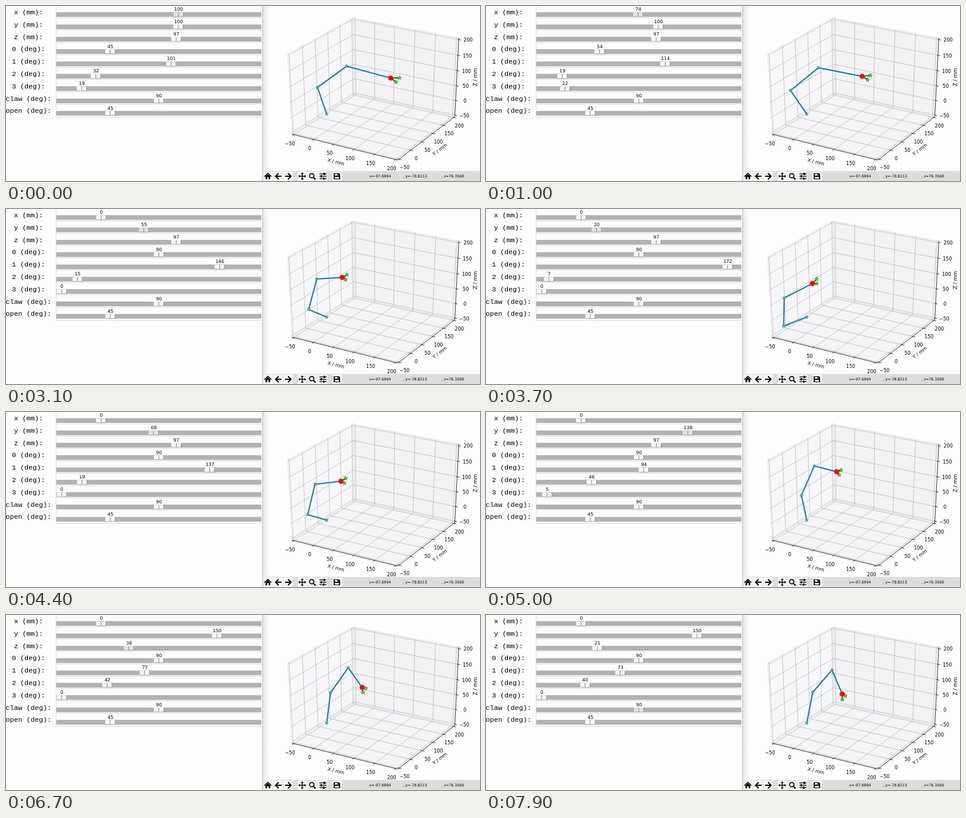
An HTML page with a canvas that plays this animation: 800 by 295 pixels, repeating every 8 s.

```html
<!DOCTYPE html>
<html lang="en">
<head>
<meta charset="utf-8">
<title>Robot arm sliders</title>
<style>
  html, body { margin: 0; width: 100%; height: 100%; overflow: hidden; background: #fefdfe; }
  canvas { display: block; }
</style>
</head>
<body>
<canvas id="stage" width="800" height="295"></canvas>
<script>
const ctx = document.getElementById('stage').getContext('2d');
const SANS = '"DejaVu Sans", sans-serif';
const PAPER = '#fefdfe';
const LOOP = 8000, STEP = 100, LAG = 100;
const DEG = Math.PI / 180;

// ---- motion: [time, value] pairs, linear in between ----
const tracks = {
  x: [[500, 100.3], [1000, 73.8], [1900, -10], [2100, -10], [2300, 0]],
  y: [[2700, 100], [3100, 55.4], [3700, 20], [4400, 68], [5100, 150]],
  z: [[5600, 97.3], [6100, 81], [6900, 21]],
  bend: [[500, 18.52], [1000, 21.52], [1400, 7], [1600, 0],
         [4500, 0], [5100, 6], [5600, 6], [6100, 4.2], [6400, 0]]
};

function valueAt(keys, t) {
  if (t <= keys[0][0]) return keys[0][1];
  for (let i = 1; i < keys.length; i++) {
    const [t0, v0] = keys[i - 1], [t1, v1] = keys[i];
    if (t <= t1) return v0 + (v1 - v0) * (t - t0) / (t1 - t0);
  }
  return keys[keys.length - 1][1];
}

// ---- inverse kinematics: upper arm, forearm, hand (mm) ----
const UPPER = 92, FORE = 86.9, HAND = 109.5, CLAW = 19;

function poseAt(t) {
  const x = valueAt(tracks.x, t), y = valueAt(tracks.y, t);
  const z = valueAt(tracks.z, t), bend = valueAt(tracks.bend, t);
  const yaw = Math.atan2(y, x), reach = Math.hypot(x, y);
  const fold = (90 - bend) * DEG;
  const tailX = FORE + HAND * Math.cos(fold), tailY = HAND * Math.sin(fold);
  const tail = Math.hypot(tailX, tailY), dist = Math.hypot(reach, z);
  const shoulder = Math.atan2(z, reach) +
    Math.acos((UPPER ** 2 + dist ** 2 - tail ** 2) / (2 * UPPER * dist));
  const elbow = Math.atan2(z - UPPER * Math.sin(shoulder), reach - UPPER * Math.cos(shoulder)) +
    Math.atan2(tailY, tailX);
  return {
    yaw, shoulder, elbow, wrist: elbow - fold,
    sliders: [x, y, z, yaw / DEG, shoulder / DEG, (elbow - shoulder) / DEG + 90, bend, 90, 45]
  };
}

// ---- drawing helpers ----
function line(points, color, width, close, fill) {
  ctx.beginPath();
  points.forEach(p => ctx.lineTo(p[0], p[1]));
  if (close) ctx.closePath();
  if (fill) { ctx.fillStyle = fill; ctx.fill(); }
  if (color) { ctx.strokeStyle = color; ctx.lineWidth = width; ctx.stroke(); }
}

function rect(x, y, w, h, color) {
  ctx.fillStyle = color;
  ctx.fillRect(x, y, w, h);
}

function label(text, x, y, font, angle = 0, align = 'center') {
  ctx.save();
  ctx.translate(x, y);
  ctx.rotate(angle * DEG);
  ctx.font = font;
  ctx.textAlign = align;
  ctx.textBaseline = 'alphabetic';
  ctx.fillStyle = '#000';
  ctx.fillText(text, 0, 3);
  ctx.restore();
}

function disc(x, y, r, color) {
  ctx.beginPath();
  ctx.arc(x, y, r, 0, 2 * Math.PI);
  ctx.fillStyle = color;
  ctx.fill();
}

function star([x, y], size, fill, stroke) {
  const points = [];
  for (let i = 0; i < 10; i++) {
    const r = i % 2 ? size * 0.42 : size, a = (i * 36 - 90) * DEG;
    points.push([x + r * Math.cos(a), y + r * Math.sin(a)]);
  }
  line(points, stroke, 0.8, true, fill);
}

// ---- sliders ----
const names = ['x (mm):', 'y (mm):', 'z (mm):', '0 (deg):', '1 (deg):',
               '2 (deg):', '3 (deg):', 'claw (deg):', 'open (deg):'];

function activeSlider(t) {
  if (t < 2300) return 0;
  if (t >= 2600 && t < 5200) return 1;
  if (t >= 5500 && t < 7300) return 2;
  return t >= 7900 ? 7 : -1;
}

function drawSliders(values, active) {
  values.forEach((value, i) => {
    const top = i * 20.8, y = top + 10.4;
    const center = i < 3 ? 160.5 + 1.303 * value : 94 + 1.822 * value;
    const left = center - 8.5;
    label(names[i], 38, top + 11, '11.67px "Liberation Mono", monospace');
    rect(84, top - 1, 348, 0.8, '#d4d4d4');
    rect(84, top, 0.8, 20, '#d4d4d4');
    rect(85, y, 346, 8, '#b1b1b1');
    rect(left, y, 17, 8, '#8c8c8c');
    rect(left, y, 16.2, 7.3, i === active ? '#e2e2e2' : '#f7f7f7');
    rect(left + 8, y + 0.5, 0.9, 6.8, '#777');
    label(String(Math.round(value)), center + 0.3, top + 5.2, '7.8px ' + SANS);
  });
  rect(84, 187, 348, 0.8, '#d4d4d4');
}

// ---- 3D axes: azimuth -60, elevation 30, mild perspective ----
const LO = -55.2, HI = 205.2;
const COS60 = 0.5, SIN60 = Math.sqrt(3) / 2;

function project(x, y, z) {
  [x, y, z] = [x, y, z].map(v => (v - LO) / (HI - LO) - 0.5);
  const depth = x * SIN60 * COS60 - y * SIN60 * SIN60 + z * 0.5;
  const scale = 10 / (10 - depth);
  const across = x * SIN60 + y * COS60;
  const up = -x * 0.25 + y * SIN60 * 0.5 + z * SIN60;
  return [622.1 + 206.3 * across * scale, 135.7 - 154.7 * up * scale];
}

const path3 = points => points.map(p => project(...p));

function drawAxes() {
  const ticks = [-50, 0, 50, 100, 150, 200];
  const pane = (points, fill) => line(path3(points), '#dedee0', 0.7, true, fill);
  pane([[LO, LO, LO], [LO, HI, LO], [LO, HI, HI], [LO, LO, HI]], '#f6f6f8');
  pane([[LO, HI, LO], [HI, HI, LO], [HI, HI, HI], [LO, HI, HI]], '#f2f2f4');
  pane([[LO, LO, LO], [HI, LO, LO], [HI, HI, LO], [LO, HI, LO]], '#f4f4f6');

  for (const t of ticks) {
    line(path3([[t, LO, LO], [t, HI, LO], [t, HI, HI]]), '#bababa', 0.8);
    line(path3([[HI, t, LO], [LO, t, LO], [LO, t, HI]]), '#bababa', 0.8);
    line(path3([[LO, LO, t], [LO, HI, t], [HI, HI, t]]), '#bababa', 0.8);
  }
  line(path3([[LO, LO, LO], [HI, LO, LO], [HI, HI, LO], [HI, HI, HI]]), '#111', 0.8);

  const font = '8px ' + SANS;
  const tick = (t, point, inner, outer, dx, dy) => {
    const [x, y] = project(...point);
    line(path3([inner, outer]), '#111', 0.8);
    label(String(t).replace('-', '\u2212'), x + dx, y + dy, font);
  };
  for (const t of ticks) {
    tick(t, [t, LO, LO], [t, LO + 3, LO], [t, LO - 6, LO], -6.5, 14.9);
    tick(t, [HI, t, LO], [HI - 3, t, LO], [HI + 6, t, LO], 9.5, 13.9);
    tick(t, [HI, HI, t], [HI - 2, HI, t], [HI + 5, HI, t], 15.8, 0.9);
  }
  label('X / mm', 557, 262.5, font, 14);
  label('Y / mm', 732, 241.5, font, -37);
  label('Z / mm', 792, 120, '8.5px ' + SANS, -90);
}

function drawArm({ yaw, shoulder, elbow, wrist }) {
  const place = (r, z) => project(r * Math.cos(yaw), r * Math.sin(yaw), z);
  let r = 0, z = 0;
  const joints = [place(r, z)];
  for (const [length, angle] of [[UPPER, shoulder], [FORE, elbow], [HAND, wrist]]) {
    r += length * Math.cos(angle);
    z += length * Math.sin(angle);
    joints.push(place(r, z));
  }
  const hand = joints.pop();
  const tips = [1, -1].map(side => {
    const a = wrist + side * 22.5 * DEG;
    return place(r + CLAW * Math.cos(a), z + CLAW * Math.sin(a));
  });
  ctx.lineJoin = 'round';
  line([...joints, hand], '#1f77b4', 2.1);
  joints.forEach(p => star(p, 3, '#4fa9c4', '#3f9a5c'));
  line([tips[0], hand, tips[1]], '#078007', 2.1);
  tips.forEach(p => star(p, 3.5, '#62d83a', '#118a22'));
  disc(...hand, 4.3, '#f00');
  ctx.lineJoin = 'miter';
}

// ---- window edge and toolbar ----
function drawWindowEdge() {
  const shade = ctx.createLinearGradient(432, 0, 444, 0);
  shade.addColorStop(0, '#cfcfcf');
  shade.addColorStop(0.4, '#f0f0f0');
  shade.addColorStop(1, PAPER);
  rect(432, 0, 12, 295, shade);
}

function drawToolbar() {
  rect(433, 278, 367, 17, '#dcdcdc');
  for (const x of [434.5, 451.3, 468.1, 492.5, 509.3, 526.1, 551]) {
    rect(x, 279, 16, 16, '#f5f5f5');
  }
  line([[436, 287.5], [442, 282], [448, 287.5]], '#000', 1.5);
  line([[438, 287], [442, 283.5], [446, 287], [446, 292], [443.2, 292], [443.2, 288.5],
        [440.8, 288.5], [440.8, 292], [438, 292]], null, 0, true, '#000');
  for (const [x, d] of [[460, -1], [476, 1]]) {
    line([[x - 5 * d, 287], [x + 4 * d, 287]], '#000', 2);
    line([[x, 282], [x + 5 * d, 287], [x, 292]], '#000', 2);
  }
  line([[495, 287], [505, 287]], '#000', 1.5);
  line([[500, 282], [500, 292]], '#000', 1.5);
  for (const [dx, dy] of [[1, 0], [-1, 0], [0, 1], [0, -1]]) {
    const x = 500 + dx * 4, y = 287 + dy * 4;
    line([[x + dx * 2.5, y + dy * 2.5], [x + dy * 2.5, y + dx * 2.5],
          [x - dy * 2.5, y - dx * 2.5]], null, 0, true, '#000');
  }
  ctx.beginPath();
  ctx.arc(516, 286, 3.7, 0, 2 * Math.PI);
  ctx.strokeStyle = '#000';
  ctx.lineWidth = 1.7;
  ctx.stroke();
  line([[518.7, 288.7], [522.5, 292.5]], '#000', 2.2);
  [[283, 537], [287, 532], [291, 536]].forEach(([y, knob]) => {
    line([[529, y], [541, y]], '#000', 1.3);
    rect(knob - 1, y - 2, 2.4, 4, '#000');
  });
  line([[553, 282], [562, 282], [564, 284], [564, 292], [553, 292]], null, 0, true, '#000');
  rect(555, 283, 6, 3, '#f5f5f5');
  rect(555, 288, 7, 3, '#f5f5f5');
  rect(559, 283, 1.3, 2.4, '#000');
  const font = '6.2px ' + SANS;
  label('x=-97.6994', 613, 286.3, font, 0, 'left');
  label(', y=-78.8213', 670, 286.3, font, 0, 'left');
  label(', z=76.3568', 735, 286.3, font, 0, 'left');
}

function frame() {
  const t = Math.floor(performance.now() % LOOP / STEP) * STEP;
  // The plot trails the sliders and only redraws during a drag.
  const plotTime = t < 2800 ? Math.min(t - LAG, 2000) : t - LAG;
  rect(0, 0, 800, 295, PAPER);
  drawSliders(poseAt(t).sliders, activeSlider(t));
  drawWindowEdge();
  drawAxes();
  drawArm(poseAt(plotTime));
  drawToolbar();
  requestAnimationFrame(frame);
}
frame();
</script>
</body>
</html>
```
